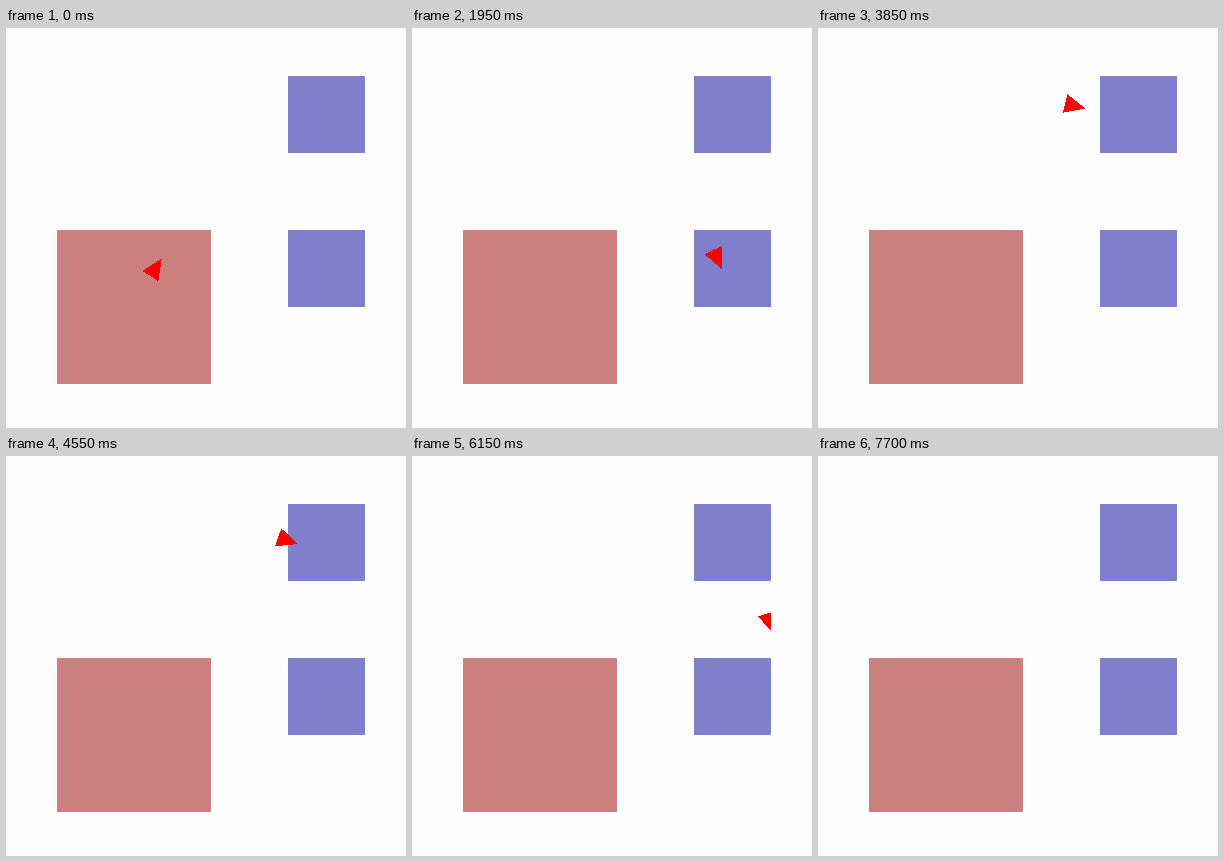
An HTML page for the animation above (8000 ms loop, 400x400 px).

```html
<!DOCTYPE html>
<html>
<head>
<meta charset="utf-8">
<style>
  html, body { margin: 0; width: 100%; height: 100%; overflow: hidden; background: #fefefe; }
  svg { display: block; width: 100vw; height: 100vh; }
</style>
</head>
<body>
<svg viewBox="0 0 400 400" shape-rendering="crispEdges">
  <clipPath id="field"><rect x="51" y="48" width="308" height="308"/></clipPath>
  <rect x="51" y="202" width="154" height="154" fill="#cb7f7e"/>
  <rect x="282" y="48" width="77" height="77" fill="#807fcb"/>
  <rect x="282" y="202" width="77" height="77" fill="#807fcb"/>
  <g clip-path="url(#field)">
    <path id="agent" d="M13.7 0L-7 9.5V-9.5Z" fill="red"/>
  </g>
</svg>
<script>
const LOOP = 8000, TICK = 50;

// Key poses: tick, x, y, heading in degrees
const poses = [
  [0, 148.2, 242.2, -57],
  [17, 188.4, 198.6, -24],
  [24, 224.5, 188.5, 0],
  [39, 304, 228.5, 65],
  [42, 306.5, 234.5, 0],
  [51, 312, 194.8, -75],
  [68, 283.1, 92.5, -143],
  [77, 254, 77.2, 14],
  [85, 268, 79.5, 15],
  [106, 308.5, 104, 40],
  [123, 357.1, 164.3, 73],
  [136, 360.5, 222, 85],
  [147, 359.5, 255.5, 180],
  [154, 370, 247, 360]
];
const last = poses.length - 1;

const secant = (i, axis) =>
  (poses[i + 1][axis] - poses[i][axis]) / (poses[i + 1][0] - poses[i][0]);

// Harmonic mean of the neighbouring slopes, flat at turning points
function slope(i, axis) {
  if (i === 0) return secant(0, axis);
  if (i === last) return secant(last - 1, axis);
  const a = secant(i - 1, axis), b = secant(i, axis);
  return a * b > 0 ? 2 * a * b / (a + b) : 0;
}

// Monotone cubic through the key poses
function sample(axis, tick, i) {
  const span = poses[i + 1][0] - poses[i][0];
  const u = (tick - poses[i][0]) / span, v = 1 - u;
  return poses[i][axis] * v * v * (1 + 2 * u) + poses[i + 1][axis] * u * u * (1 + 2 * v)
    + span * u * v * (slope(i, axis) * v - slope(i + 1, axis) * u);
}

const agent = document.getElementById("agent");

function draw() {
  const tick = Math.min(Math.floor(performance.now() % LOOP / TICK), poses[last][0]);
  let i = 0;
  while (i < last - 1 && poses[i + 1][0] <= tick) i++;
  const [x, y, heading] = [1, 2, 3].map(axis => sample(axis, tick, i));
  agent.setAttribute("transform", `translate(${x} ${y}) rotate(${heading})`);
  requestAnimationFrame(draw);
}
draw();
</script>
</body>
</html>
```
